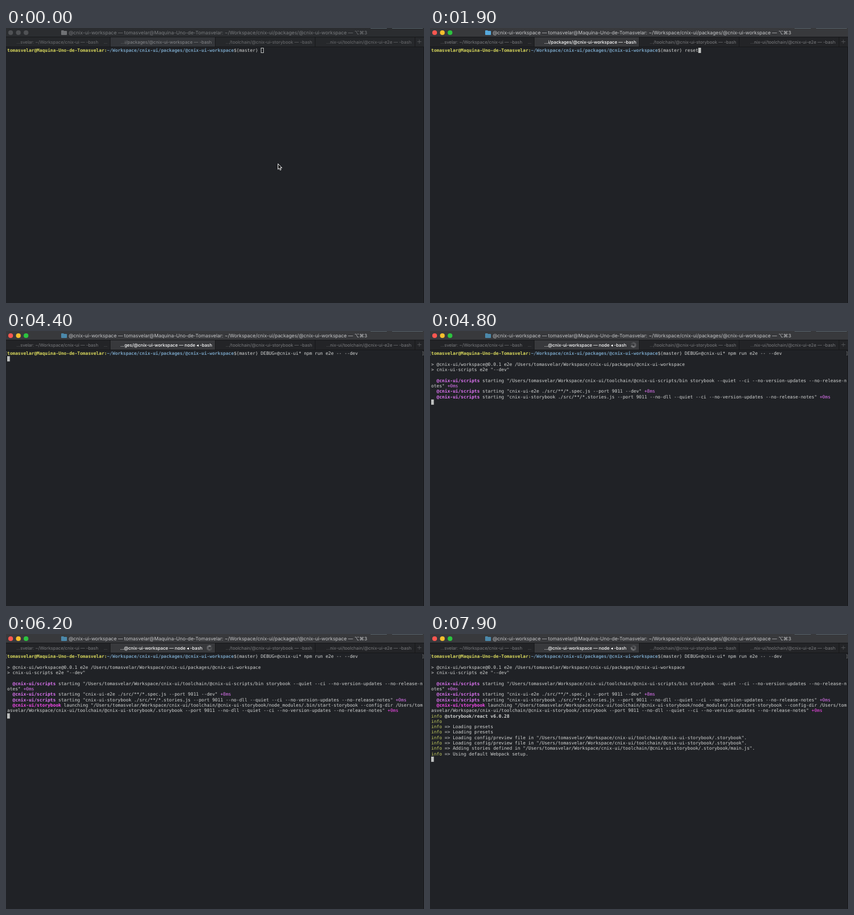
These frames come from a looping animation (720x473 px, 8000 ms). An HTML page:

```html
<!DOCTYPE html>
<html lang="en">
<head>
<meta charset="utf-8">
<title>Terminal</title>
<style>
  html, body { margin: 0; width: 100%; height: 100%; overflow: hidden; background: #202226; }
  svg { display: block; width: 720px; height: 473px; text-rendering: geometricPrecision; }
  text { white-space: pre; }
  .bar { fill: #2b2d30; }
  .tabs { fill: #26282b; }
  .active { fill: #34363a; }
  .edge { stroke: #17181a; }
  .ui { font-family: Inter, "DejaVu Sans", sans-serif; fill: #6d6e71; }
  .title { font-size: 8.4px; fill: #797b7e; }
  .tab { font-size: 7.6px; text-anchor: middle; }
  #current { fill: #86888b; }
  .light { fill: #505255; }
  #folder { fill: #707275; }
  .focus .bar { fill: #38393c; }
  .focus .tabs { fill: #232427; }
  .focus .active { fill: #38393c; }
  .focus .ui { fill: #7b7c7f; }
  .focus .title { fill: #c6c7c9; }
  .focus #current { fill: #fff; font-weight: 500; }
  .focus .red { fill: #fd5750; }
  .focus .yellow { fill: #f6be2d; }
  .focus .green { fill: #2cc43f; }
  .focus #folder { fill: #56a9dc; }
  .focus.busy #folder { fill: #4b88aa; }
  #screen { font: 7.72px "DejaVu Sans Mono", "Liberation Mono", monospace; fill: #d3d5d4; }
  #screen .user { fill: #d9d95c; font-weight: bold; }
  #screen .path { fill: #76a0c0; font-weight: bold; }
  #screen .b { font-weight: bold; }
  #screen .s { fill: #df74f4; }
  #screen .p { fill: #f84aee; }
  #screen .i { fill: #c4cd60; }
  #screen .mark { fill: #85878a; }
</style>
</head>
<body>
<svg id="stage" viewBox="0 0 720 473">
  <rect width="720" height="473" fill="#202226"/>
  <rect class="bar" width="720" height="16"/>
  <path d="M628 .5H656M665 .5H718" stroke="#56626a"/>
  <rect class="tabs" y="16" width="720" height="16"/>
  <rect class="active" x="179" y="16" width="181" height="16"/>
  <path class="edge" d="M0 15.5H720M0 32.5H720M179.5 16V32M360.5 16V32M532.5 16V32M704.5 16V32M719.5 32V473" fill="none"/>
  <circle class="light red" cx="8" cy="8" r="4.1"/>
  <circle class="light yellow" cx="21.3" cy="8" r="4.1"/>
  <circle class="light green" cx="34.5" cy="8" r="4.1"/>
  <path id="folder" d="M95 5q0-1 1-1h3l1 1h4q1 0 1 1v5q0 1-1 1h-8q-1 0-1-1z"/>
  <text class="ui title" x="108" y="11">@cnix-ui-workspace — tomasvelar@Maquina-Uno-de-Tomasvelar: ~/Workspace/cnix-ui/packages/@cnix-ui-workspace — ⌥⌘3</text>
  <text class="ui tab" x="88.5" y="26.8">…svelar: ~/Workspace/cnix-ui — -bash</text>
  <text class="ui tab" x="171.5" y="26.8">…</text>
  <text class="ui tab" id="current" y="26.8"></text>
  <text class="ui tab" x="453" y="26.8">…/toolchain/@cnix-ui-storybook — -bash</text>
  <text class="ui tab" x="625" y="26.8">…nix-ui/toolchain/@cnix-ui-e2e — -bash</text>
  <path d="M708.5 23.5H715.5M712 20V27" stroke="#5a5c5f" stroke-width=".8"/>
  <g id="spinner" stroke="#c4c5c7" stroke-width=".9" stroke-linecap="round"></g>
  <g id="screen"></g>
  <rect id="cursor"/>
  <path id="mouse" d="M468.5 233.5v9.6l2.2-2 1.5 3.4 1.6-.7-1.5-3.3h3z" fill="#111" stroke="#f4f4f4"/>
</svg>
<script>
const LOOP = 8000, COL = 4.648, ROW = 9.31;
const FOCUS = 500, RECALL = 900, SWAP = 2300, ENTER = 4000, NPM = 4500,
      SCRIPTS = 4700, LAUNCH = 5100, INFO = 6700, PRESETS = 7400, CONFIG = 7600;
const $ = id => document.getElementById(id);
const span = (cls, s) => `<tspan class="${cls}">${s}</tspan>`;

const root = '/Users/tomasvelar/Workspace/cnix-ui/';
const tools = root + 'toolchain/@cnix-ui-';
const flags = '--quiet --ci --no-version-updates --no-release-';
const prompt = span('user', 'tomasvelar@Maquina-Uno-de-Tomasvelar:') +
  span('path', '~/Workspace/cnix-ui/packages/@cnix-ui-workspace') + '$(master) ';
const command = 'DEBUG=@cnix-ui* npm run e2e -- --dev';
const script = s => '  ' + span('s b', '@cnix-ui/scripts') + ' starting ' + s;
const info = s => span('i', 'info') + ' ' + s;

// [time shown, row, markup]
const lines = [
  [NPM, 2, `> @cnix-ui/workspace@0.0.1 e2e ${root}packages/@cnix-ui-workspace`],
  [NPM, 3, '> cnix-ui-scripts e2e "--dev"'],
  [SCRIPTS, 5, script(`"${tools}scripts/bin storybook ${flags}n`)],
  [SCRIPTS, 6, 'otes" ' + span('s', '+0ms')],
  [SCRIPTS, 7, script('"cnix-ui-e2e ./src/**/*.spec.js --port 9011 --dev" ') + span('s', '+8ms')],
  [SCRIPTS, 8, script(`"cnix-ui-storybook ./src/**/*.stories.js --port 9011 --no-dll ${flags}notes" `) + span('s', '+0ms')],
  [LAUNCH, 9, '  ' + span('p b', '@cnix-ui/storybook') +
    ` launching "${tools}storybook/node_modules/.bin/start-storybook --config-dir /Users/tom`],
  [LAUNCH, 10, `asvelar/Workspace/cnix-ui/toolchain/@cnix-ui-storybook/.storybook --port 9011 --no-dll ${flags}notes" ` + span('p', '+0ms')],
  [INFO, 11, info(span('b', '@storybook/react v6.0.28'))],
  [INFO, 12, info('')],
  [INFO, 13, info('=> Loading presets')],
  [PRESETS, 14, info('=> Loading presets')],
  [CONFIG, 15, info(`=> Loading config/preview file in "${tools}storybook/.storybook".`)],
  [CONFIG, 16, info(`=> Loading config/preview file in "${tools}storybook/.storybook".`)],
  [CONFIG, 17, info(`=> Adding stories defined in "${tools}storybook/.storybook/main.js".`)],
  [CONFIG, 18, info('=> Using default Webpack setup.')],
];
// [time, cursor row] once the command runs
const stops = [[ENTER, 1], [NPM, 5], [SCRIPTS, 9], [LAUNCH, 11], [INFO, 14], [PRESETS, 15], [CONFIG, 19]];

const row = (r, s, x = 2, cls = '') =>
  `<text class="${cls}" x="${x}" y="${41.1 + r * ROW}">${s}</text>`;

function typed(t) {
  return t < RECALL ? '' : t < SWAP ? 'reset' : command;
}

function drawScreen(t) {
  let out = row(0, prompt + typed(t));
  if (t >= ENTER) out += row(0, '[', -2, 'mark') + row(0, ']', 716, 'mark');
  for (const [at, r, s] of lines) if (t >= at) out += row(r, s);
  $('screen').innerHTML = out;
}

function drawCursor(t) {
  const stop = stops.filter(([at]) => t >= at).pop();
  const hollow = t < FOCUS, inset = hollow ? .5 : 0;
  const attrs = {
    x: 2 + (stop ? 0 : (94 + typed(t).length) * COL) + inset,
    y: 34 + (stop ? stop[1] * ROW : 0) + inset,
    width: COL - inset,
    height: 9 - 2 * inset,
    fill: hollow ? 'none' : '#bfc1c0',
    stroke: hollow ? '#bfc1c0' : 'none',
  };
  for (const name in attrs) $('cursor').setAttribute(name, attrs[name]);
}

function drawTab(t) {
  const spinning = t >= SCRIPTS;
  $('current').textContent = spinning ? '…@cnix-ui-workspace — node ◂ -bash'
    : t >= ENTER ? '…ges/@cnix-ui-workspace — node ◂ -bash'
    : '…i/packages/@cnix-ui-workspace — -bash';
  $('current').setAttribute('x', spinning ? 267.5 : 276);
  const step = Math.floor(t * 12 / 1000);
  $('spinner').innerHTML = !spinning ? '' : Array.from({ length: 12 }, (_, i) =>
    `<path d="M0-2.4V-4.6" transform="translate(350.5 24) rotate(${i * 30})" opacity="${.15 + ((i - step) % 12 + 12) % 12 * .065}"/>`).join('');
}

let last = -1;
function frame() {
  const t = performance.now() % LOOP;
  const tick = Math.floor(t / 20);
  if (tick !== last) {
    last = tick;
    $('stage').setAttribute('class', (t >= FOCUS ? 'focus ' : '') + (t >= ENTER ? 'busy' : ''));
    $('mouse').setAttribute('visibility', t < RECALL ? 'visible' : 'hidden');
    drawScreen(t);
    drawCursor(t);
    drawTab(t);
  }
  requestAnimationFrame(frame);
}
frame();
</script>
</body>
</html>
```
